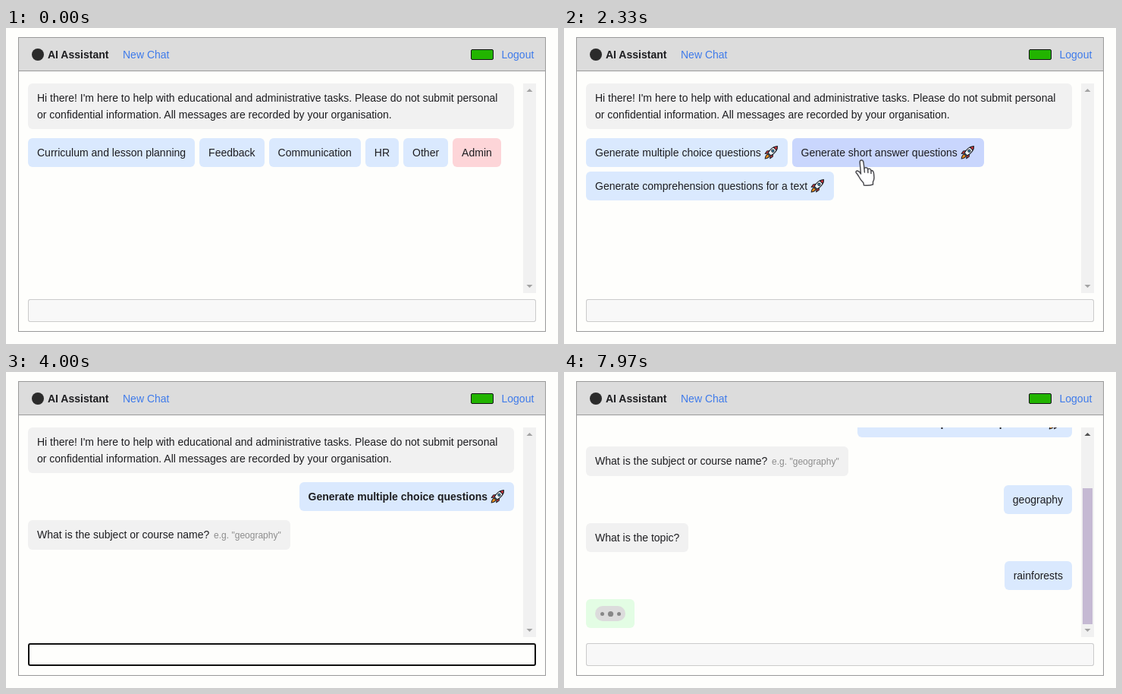
Write an HTML page that moves like this. It is 728 px wide and 416 px high and loops after 8000 ms.

```html
<!DOCTYPE html>
<html lang="en">
<head>
<meta charset="utf-8">
<title>AI Assistant</title>
<style>
  html, body { margin: 0; width: 100%; height: 100%; overflow: hidden; background: #fefefc; }
  body { position: relative; font: 14px/22px "Liberation Sans", Arial, sans-serif; color: #1d1d20; }
  body * { box-sizing: border-box; }
  svg { overflow: visible; }
  .abs, .msg, .menu, header * { position: absolute; white-space: nowrap; }

  #frame { left: 16px; top: 12px; width: 696px; height: 388px; border: 1px solid #999; }
  header { position: absolute; left: 16px; top: 12px; width: 696px; height: 45px; background: #dcdcdc; border: 1px solid #999; }
  header * { top: 11px; }
  .link { color: #3f7bea; }
  #logo { left: 17px; top: 14px; width: 16px; height: 16px; border-radius: 50%; background: #2b2b2b; }
  #level { left: 596px; top: 15px; width: 30px; height: 14px; border: 1px solid #111; border-radius: 2px; background: #22b400; }

  #view { left: 29px; top: 73px; width: 641px; height: 276px; overflow: hidden; }
  #log { inset: 0; }
  .msg, .menu span { height: 38px; padding: 8px 12px; border-radius: 6px; background: #f1f1f1; }
  .msg { left: 0; }
  .me { left: auto; right: 0; background: #dae9fe; }
  .hint { margin-left: 2px; font-size: 12px; color: #8d8d8d; }
  .menu { top: 72px; width: 641px; display: flex; flex-wrap: wrap; gap: 6px; }
  .menu span { background: #dae9fe; }
  .menu .admin { background: #fdd5d8; }
  .menu .hover { background: #c9d6fd; }
  .rocket { width: 19px; height: 18px; vertical-align: -4px; }

  #wait { top: 323px; width: 64px; background: #e3fde4; }
  #pill { left: 12px; top: 9px; width: 40px; height: 20px; border-radius: 10px; background: #dcdcdc; }
  #pill i { position: absolute; top: 7.5px; width: 5px; height: 5px; border-radius: 50%; background: #878787; }

  #bar { left: 682px; top: 73px; width: 17px; height: 276px; background: #f1f1f1; }
  #bar svg { position: absolute; inset: 0; }
  #thumb { left: 2px; top: 80px; width: 13px; height: 179px; background: #c5b9d3; }

  #field { left: 29px; top: 357px; width: 670px; height: 30px; padding-left: 7px; border-radius: 3px;
    display: flex; align-items: center; background: #f8f8f8; box-shadow: inset 0 0 0 1px #cbcbcb; }
  #field.focus { background: #fefefc; box-shadow: inset 0 0 0 2px #101010; }
  #caret { width: 1px; height: 16px; background: #000; }
  #hand { left: 0; top: 0; width: 26px; height: 36px; }
</style>
</head>
<body>
<svg width="0" height="0" style="position:absolute">
  <symbol id="rocket" viewBox="0 0 19 18">
    <g stroke="#22242a" stroke-width="1.1" stroke-linejoin="round">
      <path fill="#f7941d" d="M4.8 11C2.5 12 1.6 14.5 1.2 17 3.7 16.5 6.2 15.6 7.2 13.4Z"/>
      <path fill="#d8343c" d="M7 6.5 3.6 7 1.2 10.5 5 10ZM11.6 11 11.2 14.4 7.7 16.8 8.2 13Z"/>
      <path fill="#eaf4fa" d="M17.5.7C11.5 1 8 4 5.2 9.5L8.7 13C14.2 10 17.3 6.5 17.5.7Z"/>
      <path fill="#e8343c" d="M17.5.7C15.5.8 13.8 1.2 12.3 2L16.2 5.9C17 4.3 17.4 2.6 17.5.7Z"/>
      <circle fill="#3fa9e0" cx="11.4" cy="6.8" r="1.6"/>
    </g>
  </symbol>
</svg>

<div id="frame" class="abs"></div>
<header>
  <i id="logo"></i>
  <b style="left:38px">AI Assistant</b>
  <span class="link" style="left:137px">New Chat</span>
  <i id="level"></i>
  <span class="link" style="left:636.5px">Logout</span>
</header>

<div id="view" class="abs">
  <div id="log" class="abs">
    <div class="msg" style="top:0;width:641px;height:60px">Hi there! I'm here to help with educational and administrative tasks. Please do not submit personal<br>or confidential information. All messages are recorded by your organisation.</div>
    <div class="msg me" data-at="3570" style="top:72px"><b>Generate multiple choice questions *</b></div>
    <div class="msg" data-at="3570" style="top:122px;height:39px">What is the subject or course name? <span class="hint">e.g. "geography"</span></div>
    <div class="msg me" data-at="5700" style="top:173px">geography</div>
    <div class="msg" data-at="5700" style="top:223px">What is the topic?</div>
    <div class="msg me" data-at="7200" style="top:273px">rainforests</div>
    <div class="msg" data-at="7200" id="wait"><div id="pill" class="abs"><i style="left:7px"></i><i style="left:18px"></i><i style="left:29px"></i></div></div>
  </div>
</div>

<div id="bar" class="abs">
  <svg width="17" height="276" fill="#a3a3a3"><path id="up" d="M4.5 11 8.5 7 12.5 11Z"/><path d="M4.5 265 8.5 269 12.5 265Z"/></svg>
  <div id="thumb" class="abs"></div>
</div>

<div id="field" class="abs"><span id="typed"></span><i id="caret"></i></div>

<svg id="hand" class="abs" viewBox="0 0 26 36" fill="#fff" stroke="#4c4c50" stroke-width="1.5" stroke-linejoin="round" stroke-linecap="round">
  <path d="M6.2 4Q6 1 8.3 1 10.6 1 11 4L12 12Q12.5 10.5 14.5 10.8 16.3 11 16.7 13 17.5 11.8 19.3 12.4 20.8 13 21 15 22 14.2 23.3 15.2 24.5 16.3 24.6 19L25 24Q25 27 23.5 29.5V33Q18 35 11.5 34L11 31Q7 27 4.5 22 2.6 18.8 1.2 17.5 .5 15.5 2.5 15 5 15 7.5 19Z"/>
  <path fill="none" d="M12 12 12.4 17M16.7 13 16.9 17.5M21 15V18.5"/>
</svg>

<script>
const LOOP = 8000;
const $ = id => document.getElementById(id);
const clamp = v => Math.max(0, Math.min(1, v));
const withIcon = s => s.replace('*', '<svg class="rocket"><use href="#rocket"/></svg>');
const show = (el, on) => { el.style.visibility = on ? 'inherit' : 'hidden'; };

// Menus: start, end, labels ("*" is the rocket)
const menus = [
  [0, 1000, ['Curriculum and lesson planning', 'Feedback', 'Communication', 'HR', 'Other', 'Admin']],
  [1000, 2330, ['Plan a lesson *', 'Write a model answer', 'Generate questions', 'Script an explanation *',
    'List Tier 3 vocabulary for a topic', 'Generate text about a topic']],
  [2330, 3570, ['Generate multiple choice questions *', 'Generate short answer questions *',
    'Generate comprehension questions for a text *']]
].map(([from, to, labels]) => {
  const el = document.createElement('div');
  el.className = 'menu';
  el.innerHTML = labels.map(s => `<span${s === 'Admin' ? ' class="admin"' : ''}>${withIcon(s)}</span>`).join('');
  $('log').append(el);
  return { from, to, el };
});

const timed = [...document.querySelectorAll('[data-at]')];
const bold = document.querySelector('.me b');
bold.innerHTML = withIcon(bold.textContent);
const dots = [...$('pill').children];

const easeIn = u => u * u;
const easeOut = u => u * (2 - u);

// Pointer stops: time, x, y, easing towards the stop
const stops = [
  [480, 24, 172], [770, 130, 172, easeOut], [1400, 130, 172, easeIn],
  [1785, 315, 172, easeIn], [1970, 384, 173, easeOut], [2680, 384, 173, easeIn],
  [2885, 319, 177, easeIn], [3300, 158, 172, easeOut]
];

function pointer(t) {
  const i = stops.findIndex(s => s[0] > t);
  if (i < 1) return (i ? stops[stops.length - 1] : stops[0]).slice(1, 3);
  const [t0, x0, y0] = stops[i - 1], [t1, x1, y1, ease] = stops[i];
  const u = ease((t - t0) / (t1 - t0));
  return [x0 + (x1 - x0) * u, y0 + (y1 - y0) * u];
}

// Words: submit time, text, key times
const words = [
  [5700, 'geography', [4470, 4630, 4730, 5000, 5130, 5270, 5330, 5430, 5570]],
  [7200, 'rainforests', [5930, 6030, 6130, 6230, 6400, 6500, 6630, 6730, 6830, 7000, 7100]]
];

function typedAt(t) {
  const word = words.find(w => t < w[0]);
  return word ? word[1].slice(0, word[2].filter(k => k <= t).length) : '';
}

const pulse = (t, start) => 1 + 0.45 * Math.sin(Math.PI * clamp((t - start) / 440));

function render(t) {
  const [x, y] = pointer(t);
  const active = t >= 500 && t < 3900;
  $('hand').style.transform = `translate(${x}px, ${y}px)`;
  $('hand').style.opacity = clamp((t - 470) / 90) * clamp((3880 - t) / 120);

  for (const { from, to, el } of menus) {
    show(el, t >= from && t < to);
    for (const b of el.children) {
      const dx = x + 8 - 29 - b.offsetLeft, dy = y + 1 - 145 - b.offsetTop;
      b.classList.toggle('hover', active && dx >= 0 && dx < b.offsetWidth && dy >= 0 && dy < 38);
    }
  }

  for (const el of timed) show(el, t >= +el.dataset.at);
  const waiting = t >= 7200;
  $('log').style.transform = waiting ? 'translateY(-97px)' : 'none';
  show($('thumb'), waiting);
  $('up').style.fill = waiting ? '#505050' : '';

  $('field').classList.toggle('focus', t >= 3570 && !waiting);
  $('typed').textContent = typedAt(t);
  show($('caret'), (t >= 3570 && t < 4000) || (t >= 4470 && !waiting));
  dots.forEach((d, i) => { d.style.transform = `scale(${pulse(t, 7480 + i * 260)})`; });
}

const start = performance.now();
function tick() {
  render((performance.now() - start) % LOOP);
  requestAnimationFrame(tick);
}
tick();
</script>
</body>
</html>
```
